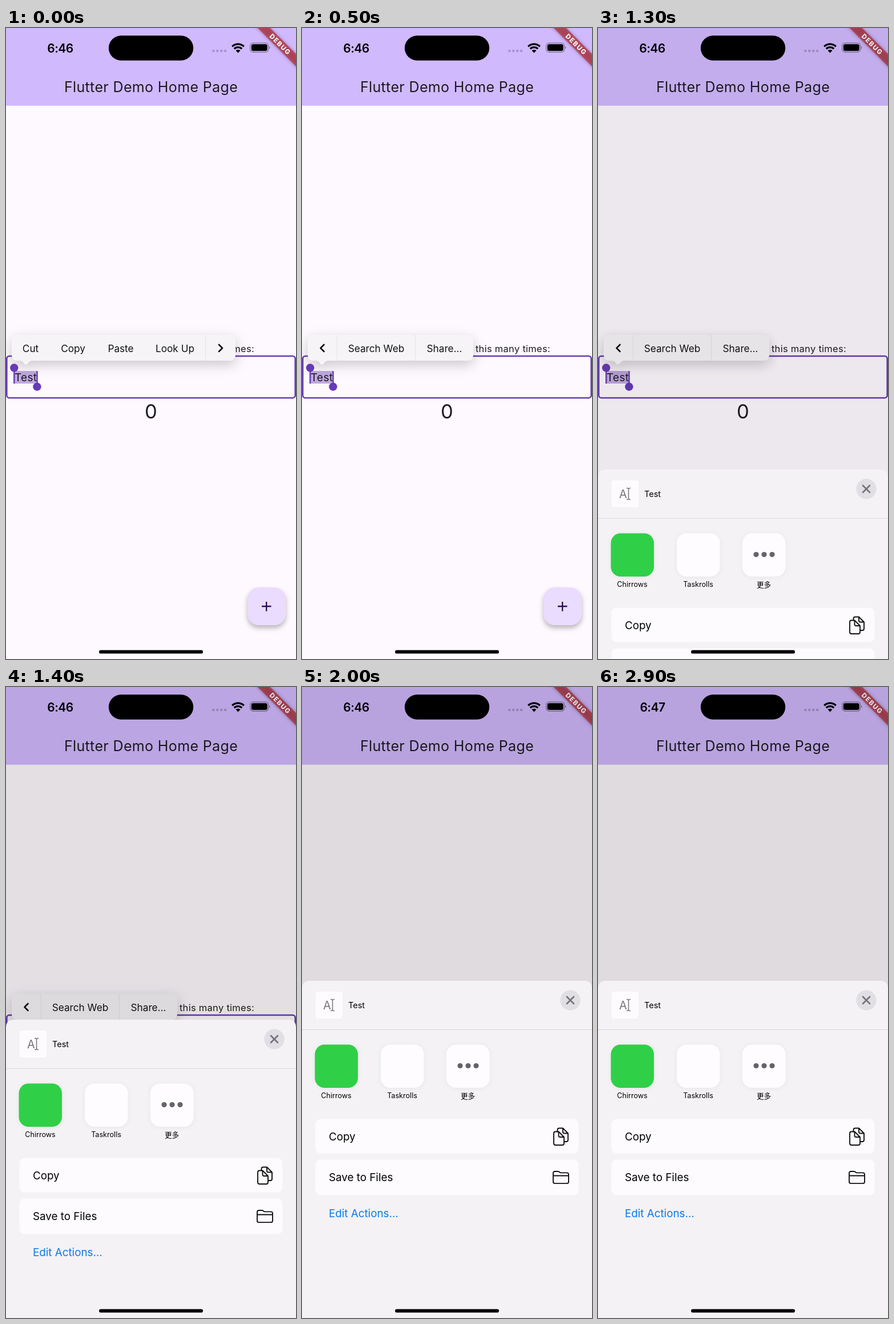
An HTML page for the animation above (4000 ms loop, 508 by 1102 pixels).

```html
<!DOCTYPE html>
<html lang="en">
<head>
<meta charset="utf-8">
<title>Text selection menu and share sheet</title>
<style>
  html, body { margin: 0; height: 100%; overflow: hidden; background: #fef9fe; }
  svg { display: block; width: 100%; height: 100%; }
  text { font-family: Inter, "Noto Sans CJK SC", "Noto Sans CJK", sans-serif; fill: #1d1b20; }
  .mid { text-anchor: middle; }
  .clock { font-size: 21px; font-weight: 600; letter-spacing: -.5px; fill: #000; }
  .item { font-size: 17.2px; fill: #111; }
  .label { font-size: 12.6px; fill: #000; }
  .action { font-size: 18.8px; fill: #000; }
  .line { fill: none; stroke-linecap: round; stroke-linejoin: round; }
  .menu { filter: drop-shadow(0 7px 11px #0003); }
  .fab { filter: drop-shadow(0 5px 4px #0004); }
  .icon { filter: drop-shadow(0 1px 4px #0000000d); }
  .banner { filter: drop-shadow(0 0 3px #0007); }
</style>
</head>
<body>
<svg viewBox="0 0 508 1102">
  <!-- app page -->
  <rect width="508" height="1102" fill="#fef9fe"/>
  <rect width="508" height="135.7" fill="#d1b9fe"/>
  <text class="mid" x="254" y="112" font-size="25" letter-spacing=".36">Flutter Demo Home Page</text>
  <text x="435" y="566" font-size="16.5" letter-spacing=".28" text-anchor="end">You have pushed the button this many times:</text>
  <rect x="1.3" y="573" width="505.4" height="73" rx="4.5" fill="none" stroke="#673ab7" stroke-width="2.6"/>
  <text class="mid" x="254" y="682" font-size="34.5">0</text>
  <rect x="14" y="599" width="41" height="22" fill="#c0a9df"/>
  <text x="15" y="617" font-size="19" letter-spacing=".3">Test</text>
  <rect class="fab" x="423" y="977" width="67" height="66" rx="20" fill="#eadcff"/>
  <path d="M448 1010h16.5M456.2 1002v16.5" stroke="#2a0a5e" stroke-width="2.3"/>

  <!-- selection menu -->
  <path id="bubble" class="menu" fill="#f6f4f7"/>
  <g id="page1">
    <text class="item mid" x="43" y="565.5">Cut</text>
    <text class="item mid" x="117.5" y="565.5">Copy</text>
    <text class="item mid" x="201" y="565.5">Paste</text>
    <text class="item mid" x="296" y="565.5">Look Up</text>
    <path d="M349.5 536v45" stroke="#e6e3e8"/>
    <path class="line" d="M373 553l6 6l-6 6" stroke="#111" stroke-width="2.6"/>
  </g>
  <g id="page2">
    <path class="line" d="M38.5 553l-6 6l6 6" stroke="#111" stroke-width="2.6"/>
    <path d="M61.5 536v45M198.5 536v45" stroke="#e6e3e8"/>
    <text class="item mid" x="130" y="565.5">Search Web</text>
    <text class="item mid" x="249.5" y="565.5">Share…</text>
  </g>
  <g fill="#673ab7">
    <path d="M14.3 594v27M54.5 599v27" stroke="#673ab7" stroke-width="2.4"/>
    <circle cx="14.3" cy="593.5" r="7.2"/>
    <circle cx="54.4" cy="626.5" r="7.2"/>
  </g>

  <!-- debug ribbon -->
  <g transform="translate(508 0) rotate(45)">
    <rect class="banner" x="-60" y="32" width="120" height="15.5" fill="#b71c1ca0"/>
    <text class="mid" x=".7" y="44" font-size="11.5" font-weight="800" letter-spacing="1.4" style="fill:#fff">DEBUG</text>
  </g>
  <rect id="dim" width="508" height="1102"/>

  <!-- status bar -->
  <text id="before" class="clock mid" x="95" y="42.5">6:46</text>
  <text id="after" class="clock mid" x="95.5" y="42.5">6:47</text>
  <rect x="179.8" y="13.3" width="148.4" height="43.4" rx="21.7"/>
  <path class="line" d="M363.3 40h.01m6.9 0h.01m6.9 0h.01m6.9 0h.01" stroke="#0003" stroke-width="4.6"/>
  <path d="M406.5 43.5l-4-4.2a5.8 5.8 0 0 1 8 0z"/>
  <path d="M399.8 36.3a9.6 9.6 0 0 1 13.4 0M396.2 32.3a14.8 14.8 0 0 1 20.6 0" fill="none" stroke="#000" stroke-width="3.2"/>
  <rect x="427.7" y="26.2" width="32" height="15.8" rx="5" fill="none" stroke="#0006" stroke-width="1.3"/>
  <rect x="429.8" y="28.2" width="27.9" height="11.8" rx="3.3"/>
  <path d="M461.3 31.5q3 2.6 0 5.2z" fill="#0006"/>

  <!-- share sheet -->
  <g id="sheet">
    <path id="panel" fill="#f4f2f5"/>
    <rect x="24" y="19" width="47" height="47" rx="4" fill="#fdfbfe"/>
    <text x="37" y="50" font-size="20" style="fill:#77757a">A</text>
    <path class="line" d="M50.5 32.5q3 0 3 2v16q0 2-3 2m6-20q-3 0-3 2m0 16q0 2 3 2" stroke="#77757a" stroke-width="1.5"/>
    <text x="81" y="48" font-size="14.5" style="fill:#000">Test</text>
    <circle cx="470" cy="34" r="17.7" fill="#e2dfe4"/>
    <path class="line" d="M464 28l12 12m0-12l-12 12" stroke="#75737a" stroke-width="2.7"/>
    <path d="M0 85.5h508" stroke="#dad8dc" stroke-width="1.2"/>
    <g class="icon">
      <rect x="22.5" y="111.5" width="75.5" height="75.5" rx="17" fill="#2fd047"/>
      <rect x="138" y="111.5" width="75.5" height="75.5" rx="17" fill="#fefcff"/>
      <rect x="253" y="111.5" width="75.5" height="75.5" rx="17" fill="#fefcff"/>
    </g>
    <g fill="#66636a">
      <circle cx="277" cy="148.5" r="4.6"/>
      <circle cx="291" cy="148.5" r="4.6"/>
      <circle cx="305" cy="148.5" r="4.6"/>
    </g>
    <text class="label mid" x="60" y="205">Chirrows</text>
    <text class="label mid" x="175.5" y="205">Taskrolls</text>
    <text class="label mid" x="290.5" y="205.5">更多</text>
    <rect x="23.5" y="241.5" width="461" height="60" rx="9" fill="#fdfbfe"/>
    <rect x="23.5" y="312.5" width="461" height="62" rx="9" fill="#fdfbfe"/>
    <text class="action" x="47" y="278.5">Copy</text>
    <text class="action" x="47" y="349.5">Save to Files</text>
    <text class="action" x="47" y="412.5" style="fill:#0a7aee">Edit Actions…</text>
    <g class="line" stroke="#111" stroke-width="1.9">
      <path d="M444 263.5h5.5l9.5 9.5v11q0 3-3 3h-12q-3 0-3-3v-17.5q0-3 3-3zM449.5 263.5v7q0 2.5 2.5 2.5h7"/>
      <path d="M447.5 263.5v-3q0-3 3-3h6.5l9 9v11.5q0 3-3 3h-4M457 257.5v6.5q0 2.5 2.5 2.5h6.5"/>
      <path d="M440 338v-2q0-3 3-3h5.5q1.5 0 2.5 1.2t2.5 1.2h10.5q3 0 3 3v12.5q0 3-3 3h-21q-3 0-3-3zM440 340.5h27"/>
    </g>
  </g>
  <rect x="163" y="1086.4" width="182" height="6.2" rx="3.1"/>
</svg>
<script>
const $ = id => document.getElementById(id);
const ramp = (t, a, b) => Math.min(1, Math.max(0, (t - a) / (b - a)));
const ease = p => p * p * (3 - 2 * p);
const fade = (id, value) => $(id).setAttribute("opacity", value);

// Rounded menu body with a small pointer above the selection
const bubblePath = right =>
  `M20 536H${right - 10}q10 0 10 10v25q0 10-10 10H46q-4 0-7 4l-2 2q-2 2-4 0l-2-2q-3-4-7-4H20q-10 0-10-10v-25q0-10 10-10z`;

// Sheet with lower corners of radius r
const panelPath = r =>
  `M0 14q0-14 14-14H494q14 0 14 14V${589 - r}a${r} ${r} 0 0 1 ${-r} ${r}H${r}a${r} ${r} 0 0 1 ${-r} ${-r}z`;

// Remaining distance of a critically damped spring, 1 to 0
const spring = ms => {
  const x = Math.max(0, ms) * 0.0183;
  return (1 + x) * Math.exp(-x);
};

function draw(t) {
  $("bubble").setAttribute("d", bubblePath(402 - 102 * ease(ramp(t, 150, 400))));
  fade("page1", 1 - ramp(t, 50, 200));
  fade("page2", ramp(t, 200, 500));

  const rest = spring(t - 1196.9);
  fade("dim", 0.12 * (1 - rest));
  $("sheet").setAttribute("transform", `translate(0 ${Math.round(513 + 589 * rest)})`);
  $("panel").setAttribute("d", panelPath(t < 1700 ? 70 : 0));

  const tick = ramp(t, 2700, 2900);
  fade("before", 1 - tick);
  fade("after", tick);
}

function loop() {
  const t = performance.now() % 4000;
  draw(Math.floor(t / 100) * 100); // ten pictures a second
  requestAnimationFrame(loop);
}
loop();
</script>
</body>
</html>
```
